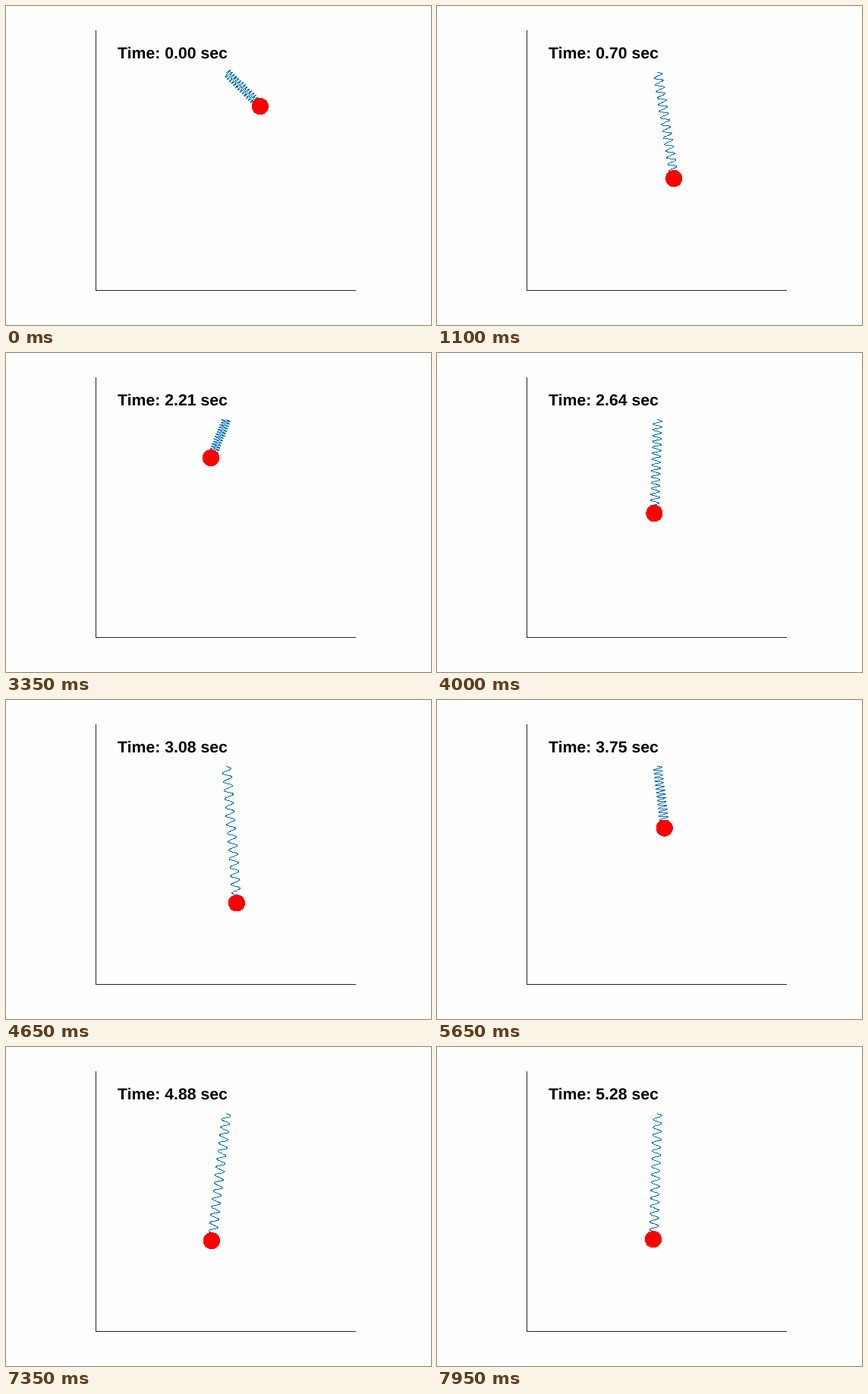
A matplotlib script that plays this animation: 560 px wide and 420 px high, repeating every 8 s.

```python
import numpy as np
import matplotlib.pyplot as plt
from matplotlib.animation import FuncAnimation
from matplotlib.patches import Circle, Rectangle

plt.rcParams["text.hinting"] = "none"

W, H, DPI = 560, 420, 100
PX = 72 / DPI                 # points per pixel
STEPS, INTERVAL = 160, 50
DT = 10 / 299                 # simulated seconds per frame
SUB = 10                      # integration steps per frame
G = 9.81
UNIT = 57.05                  # pixels per metre

# Bob positions in pixels that the swing passes through: step, x, y
WAYPOINTS = np.array([
    (0, 334.8, 132.1), (17, 322.0, 202.0), (21, 311.8, 227.2),
    (42, 254.8, 228.4), (66, 269.8, 138.2), (92, 303.8, 267.1),
    (102, 308.0, 236.0), (135, 273.8, 187.2), (158, 284.8, 253.1),
])

# Start x, start y, stiffness / mass, rest length, pivot x, pivot y
GUESS = np.array([0.783, 0.762, 10.0, 1.0, 289.9, 88.8])
SPREAD = np.array([0.03, 0.03, 0.05, 0.01, 0.5, 0.5])


def pull(pos, stiff, rest):
    acc = -stiff * (1 - rest / np.hypot(pos[0], pos[1])) * pos
    acc[1] += G
    return acc


def simulate(p):
    """Elastic pendulum released from rest; y points down, one column per run."""
    pos, (stiff, rest) = p[:2].copy(), p[2:4]
    vel, acc = np.zeros_like(pos), pull(pos, stiff, rest)
    h = DT / SUB
    track = [pos.copy()]
    for _ in range(STEPS - 1):
        for _ in range(SUB):
            vel += acc * h / 2
            pos += vel * h
            acc = pull(pos, stiff, rest)
            vel += acc * h / 2
        track.append(pos.copy())
    return np.array(track)


def residuals(p):
    steps = WAYPOINTS[:, 0].astype(int)
    miss = p[4:] + UNIT * simulate(p)[steps] - WAYPOINTS[:, 1:, None]
    prior = (p - GUESS[:, None]) / SPREAD[:, None]
    return np.vstack([miss.reshape(-1, p.shape[1]) / 0.5, prior])


def fit():
    """Gauss-Newton refinement of the guess towards the waypoints."""
    p, eps = GUESS.copy(), SPREAD * 1e-3
    for _ in range(8):
        runs = p[:, None] + np.hstack([np.zeros((p.size, 1)), np.diag(eps)])
        res = residuals(runs)
        jac = (res[:, 1:] - res[:, :1]) / eps
        p = p - np.linalg.lstsq(jac, res[:, 0], rcond=None)[0]
    return p


params = fit()
pivot = params[4:]
track = simulate(params[:, None])[:, :, 0] * UNIT

fig = plt.figure(figsize=(W / DPI, H / DPI), dpi=DPI, facecolor="#fefefe")
ax = fig.add_axes([0, 0, 1, 1])
ax.set(xlim=(0, W), ylim=(H, 0))
ax.axis("off")

for x, y, w, h in [(118, 32, 1, 343), (118, 374, 343, 1)]:
    ax.add_patch(Rectangle((x, y), w, h, fc="#262626", lw=0, antialiased=False))

# Pixel markers keep the wire one crisp pixel wide
spring, = ax.plot([], [], ",", color="#0072bd", zorder=2)
bob = ax.add_patch(Circle((0, 0), 10.5, fc="#ff0000", lw=0, antialiased=False, zorder=3))
clock = ax.text(147.2, 69, "", family="Liberation Sans", weight="bold",
                size=21.33 * PX, color="black", va="baseline")

s = np.linspace(0, 1, 620)
wave = 0.1 * UNIT * np.sin(100 * s)


def draw(n):
    i = max(n - 1, 0)
    dx, dy = track[i]
    r = np.hypot(dx, dy)
    spring.set_data(pivot[0] + s * dx + wave * dy / r,
                    pivot[1] + s * dy - wave * dx / r)
    bob.center = (pivot[0] + dx, pivot[1] + dy)
    clock.set_text(f"Time: {i * DT:.2f} sec")
    return spring, bob, clock


anim = FuncAnimation(fig, draw, frames=STEPS, interval=INTERVAL,
                     repeat=True, repeat_delay=0)
plt.show()
```
